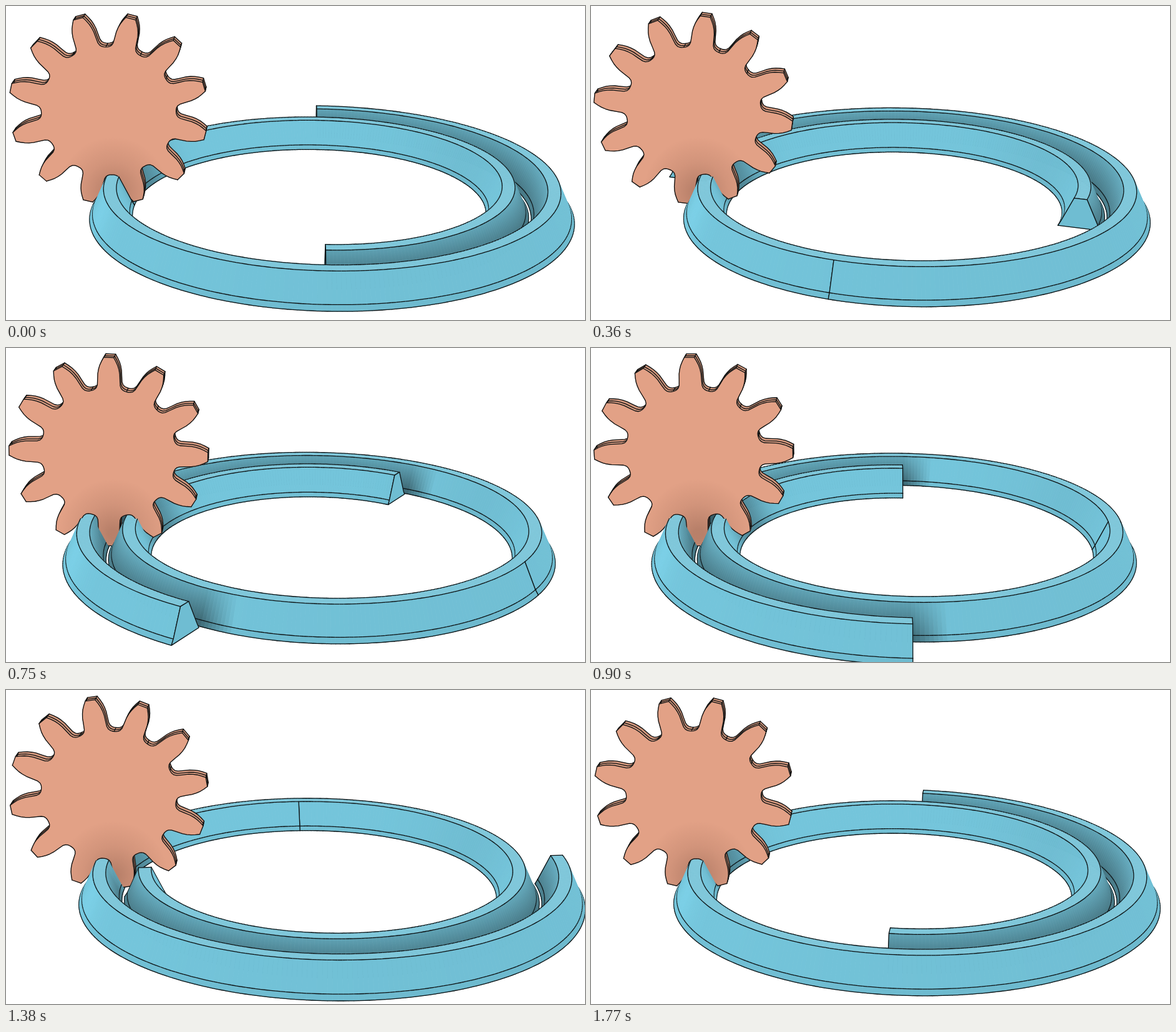
These frames come from a looping animation (928 by 504 pixels, 1800 ms). An HTML page with a canvas:

```html
<!DOCTYPE html>
<html>
<head>
<meta charset="utf-8">
<title>Spiral thread and gear</title>
<style>
html, body { margin: 0; width: 100%; height: 100%; overflow: hidden; background: #fff; }
canvas { display: block; }
</style>
</head>
<body>
<canvas id="stage" width="928" height="504"></canvas>
<script>
const ctx = document.getElementById('stage').getContext('2d');
const RAD = Math.PI / 180, LOOP = 1800, TICK = 30;
const TURN = 540, SEAM = 270, STEP = 1, PITCH = 71;
const clamp = v => Math.max(0, Math.min(1, v));
const bump = (a, centre, width) => {
  const d = ((a - centre) % 360 + 540) % 360 - 180;
  return Math.exp(-((d / width) ** 2));
};

// Thread section: [radial offset from the top outer edge, height]
const SECTION = [[-43, -48.5], [-39, -41], [-20, 0], [0, 0], [19, -41], [24, -48.5]];
// Half of a tooth: [radius, degrees from the tooth axis], root to tip
const FLANK = [[105, 15], [105.2, 13.3], [106, 11.8], [108, 10.2], [112, 9], [120, 8.2],
  [130, 7.4], [137, 6.5], [143, 5.5], [149, 4.2], [155, 2.8]];

// x right, y up, z toward the viewer; y = 0 is the top of the thread
function project(x, y, z) {
  const k = 1 / (1 - 4.44e-4 * z - 1.57e-4 * y);
  return [455 + (x + 50) * k, 252 + (24.5 + 0.007 * x + 0.334 * z - 0.9425 * y) * k];
}

function trace(points, closed) {
  ctx.beginPath();
  points.forEach(p => ctx.lineTo(p[0], p[1]));
  if (closed) ctx.closePath();
}
function line(points, closed) {
  trace(points, closed);
  ctx.strokeStyle = '#0b0f10';
  ctx.lineWidth = 1.3;
  ctx.stroke();
}
function patch(points, paint) {
  trace(points, true);
  ctx.fillStyle = ctx.strokeStyle = paint;
  ctx.lineWidth = 0.8;
  ctx.fill();
  ctx.stroke();
}
function area(points) {
  return points.reduce((sum, p, i) => {
    const q = points[(i + 1) % points.length];
    return sum + p[0] * q[1] - q[0] * p[1];
  }, 0);
}

const blue = f => `rgb(${116 * f},${197 * f},${219 * f})`;
const mid = (a, b) => [(a[0] + b[0]) / 2, (a[1] + b[1]) / 2];

const radius = s => 344 + PITCH * (0.75 - s / 360);
function section(s, spin) {
  const a = (90 + spin - s) * RAD;
  return SECTION.map(([o, y]) => {
    const r = radius(s) + o;
    return project(r * Math.cos(a), y, -r * Math.sin(a));
  });
}

function facetPaint(i, quad, s, angle) {
  if (i == 2) return '#7fc7da';
  const outer = i > 2;
  // Walls that face the neighbouring turn lie in shadow
  const dark = clamp(outer ? (s - 351) / 9 : (189 - s) / 9)
    * (0.7 + 0.3 * Math.abs(Math.sin(angle * RAD)));
  let f = outer
    ? 1 - 0.03 * Math.max(0, Math.cos((angle + 45) * RAD))
      + (1 - dark) * 0.05 * bump(angle, 198, 9)
    : 1 - 0.3 * bump(angle, 165, 14) - 0.04 * bump(angle, 30, 25);
  if (i == 0 || i == 4) return blue(f * (0.97 - 0.45 * dark));
  if (!dark) return blue(f);
  const hi = outer ? mid(quad[0], quad[3]) : mid(quad[1], quad[2]);
  const lo = outer ? mid(quad[1], quad[2]) : mid(quad[0], quad[3]);
  const g = ctx.createLinearGradient(...hi, ...lo);
  g.addColorStop(0, blue(f * (1 - 0.16 * dark)));
  g.addColorStop(1, blue(f * (1 - 0.48 * dark)));
  return g;
}

function drawSegment(s, spin) {
  const end = s + STEP;
  const a = section(s, spin), b = section(end, spin);
  const angle = 90 + spin - s - STEP / 2;
  const seen = [];
  for (let i = 0; i < 5; i++) {
    const quad = [a[i], a[i + 1], b[i + 1], b[i]];
    seen[i] = area(quad) > 0;
    if (seen[i]) patch(quad, facetPaint(i, quad, s, angle));
  }
  for (let i = 0; i < 6; i++)
    if (seen[i - 1] || seen[i]) line([a[i], b[i]]);
  for (let i = 0; i < 5; i++) {
    if (!seen[i]) continue;
    const seam = i != 2;
    if (s == 0 || (s == SEAM && seam)) line([a[i], a[i + 1]]);
    if (end == TURN || (end == SEAM && seam)) line([b[i], b[i + 1]]);
  }
  const cap = s == 0 ? a : end == TURN ? b : null;
  if (cap && (s == 0 ? -1 : 1) * area(cap) > 0) {
    patch(cap, blue(0.96));
    line(cap, true);
  }
}

function gearOutline(turn, z) {
  const points = [];
  for (let tooth = 0; tooth < 12; tooth++) {
    const add = (r, off) => {
      const a = (tooth * 30 - turn + off) * RAD, x = r * Math.sin(a);
      points.push(project(-334 + x, 111.5 + r * Math.cos(a), z - 0.05 * x));
    };
    FLANK.forEach(([r, d]) => add(r, -d));
    FLANK.slice(1).reverse().forEach(([r, d]) => add(r, d));
  }
  return points;
}

function drawGear(turn) {
  const front = gearOutline(turn, 8), centre = gearOutline(turn, -3), back = gearOutline(turn, -16);
  const n = front.length, perTooth = n / 12;
  front.forEach((p, i) => {
    const j = (i + 1) % n, q = front[j];
    const slope = (q[0] - p[0]) / Math.hypot(q[0] - p[0], q[1] - p[1]);
    const f = 0.84 + 0.12 * slope;
    patch([p, q, back[j], back[i]], `rgb(${226 * f},${162 * f},${134 * f})`);
  });
  line(back, true);
  line(centre, true);
  const tip = FLANK.length - 1;
  for (let i = 0; i < n; i += perTooth)
    for (const k of [i, i + tip, i + tip + 1]) line([front[k], back[k]]);
  patch(front, '#e2a186');
  const shadow = ctx.createRadialGradient(172, 298, 8, 172, 298, 88);
  shadow.addColorStop(0, 'rgba(110,70,55,.36)');
  shadow.addColorStop(0.5, 'rgba(120,75,60,.15)');
  shadow.addColorStop(1, 'rgba(120,75,60,0)');
  trace(front, true);
  ctx.fillStyle = shadow;
  ctx.fill();
  line(front, true);
}

function draw(phase) {
  const spin = 360 * phase;
  const segments = [];
  for (let s = 0; s < TURN; s += STEP) {
    const m = s + STEP / 2;
    segments.push({ s, z: -(radius(m) - 10) * Math.sin((90 + spin - m) * RAD) });
  }
  segments.sort((a, b) => a.z - b.z);
  ctx.fillStyle = '#fff';
  ctx.fillRect(0, 0, 928, 504);
  ctx.lineCap = ctx.lineJoin = 'round';
  const split = segments.findIndex(g => g.z > 2);
  segments.slice(0, split).forEach(g => drawSegment(g.s, spin));
  drawGear(15 + 30 * phase);
  segments.slice(split).forEach(g => drawSegment(g.s, spin));
}

function frame(now) {
  draw(Math.floor(now % LOOP / TICK) * TICK / LOOP);
  requestAnimationFrame(frame);
}
draw(0);
requestAnimationFrame(frame);
</script>
</body>
</html>
```
